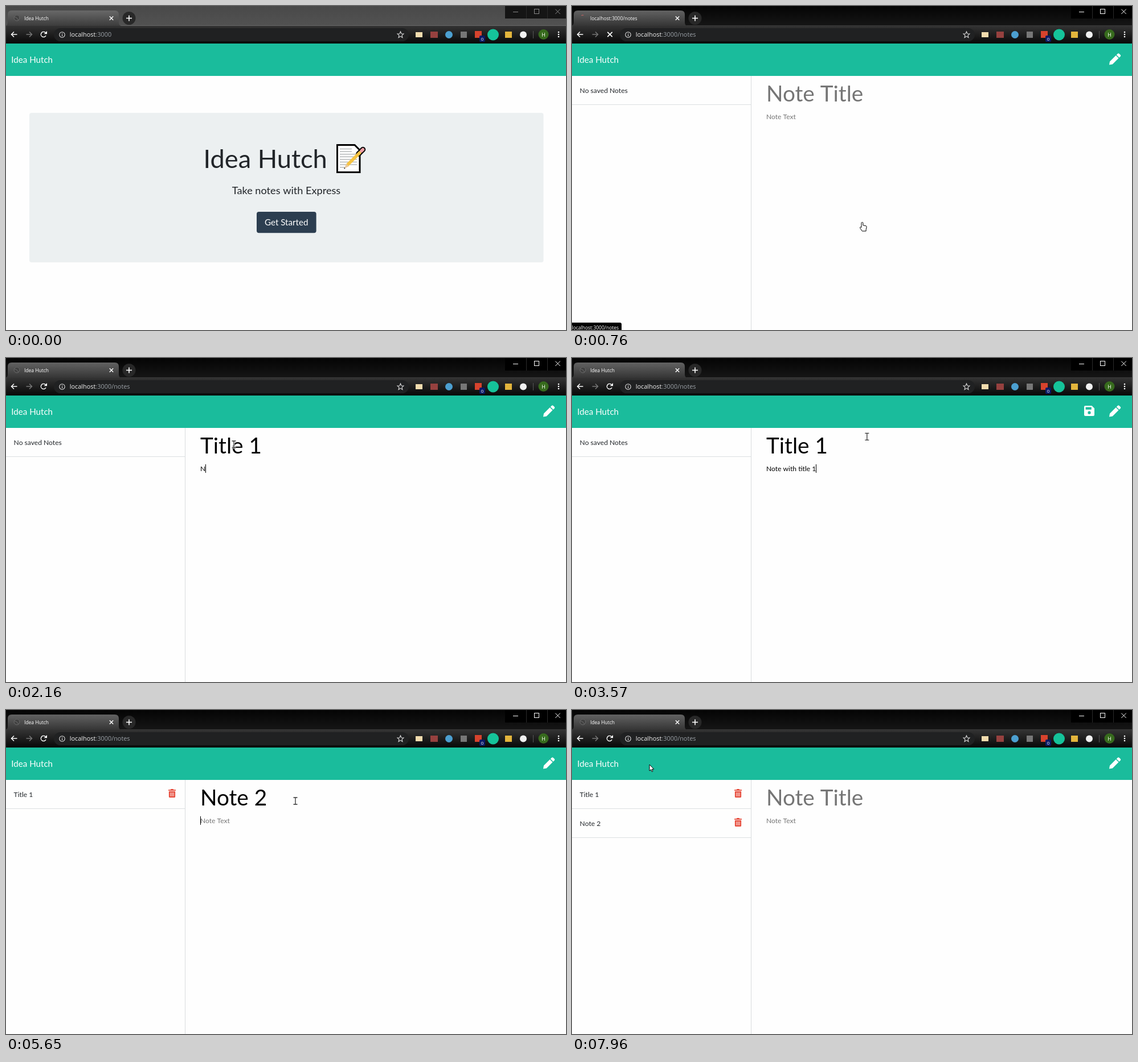
An HTML page with a canvas for the animation above (8000 ms loop, 983 by 570 pixels).

```html
<!DOCTYPE html>
<html lang="en">
<head>
<meta charset="utf-8">
<title>Idea Hutch</title>
<style>
  html, body { margin: 0; width: 100%; height: 100%; overflow: hidden; background: #fefefe; }
  canvas { display: block; }
</style>
</head>
<body>
<canvas id="stage" width="983" height="570"></canvas>
<script>
const ctx = document.getElementById('stage').getContext('2d');
const LOOP = 8000;
const APP = 'Idea Hutch';
const LATO = 'Lato, sans-serif';
const UI = '"Open Sans", sans-serif';
const INK = '#212529';
const ZOOM = 0.807; // page zoom: CSS font sizes to stage pixels
const SIZE = { body: 15 * ZOOM, brand: 18.75 * ZOOM, lead: 22.5 * ZOOM, title: 48 * ZOOM, hero: 56 * ZOOM };
const CLICK = 620, NOTES = 760, LOADED = 840;

// Typed runs: [start ms, ms per key, text]
const drafts = [
  { from: 0, saved: 4440,
    title: [[1720, 55, 'Title 1']],
    body: [[2150, 85, 'Note'], [2560, 60, ' with title 1']] },
  { from: 4440, saved: 7310,
    title: [[5000, 90, 'Note '], [5480, 1, '2']],
    body: [[5660, 85, 'Body of n'], [6480, 75, 'ote 2']] },
];
const focus = [[1050, 2100, 'title'], [2100, 4300, 'body'], [4850, 5580, 'title'], [5580, 7290, 'body']];
const saveShown = [[2230, 4440], [5740, 7310]];

// Pointer track: [ms, x, y]
const track = [
  [150, 640, 520], [520, 509.5, 380.5], [860, 509.5, 380.5], [1060, 404, 160], [1400, 400, 152],
  [3380, 400, 152], [4210, 912, 93], [4290, 908, 86], [4440, 913, 95], [4580, 913, 95],
  [4700, 576, 140], [4900, 508, 160], [6860, 508, 160], [7120, 901, 90], [7310, 902, 93],
  [7440, 902, 94], [7600, 600, 126], [7800, 250, 118], [7950, 136, 96],
];

const shapes = {
  arrow: new Path2D('M0 0V11L2.6 8.7 4.2 12.5 5.9 11.8 4.3 8.1H7.8Z'),
  hand: new Path2D('M-1.5 9V1.3Q-1.5 0 0 0 1.4 0 1.4 1.3V5.3L6.5 6.3Q7.8 6.8 7.6 8.5L6.6 13V15.5H-.2L-3.9 10Q-4.3 8.3-3 8.3Z'),
  beam: new Path2D('M-3.5-6H3.5M0-6V6M-3.5 6H3.5'),
  pencil: new Path2D('M0 20.5 1 14.7 11.7 4 16.5 8.8 5.8 19.5ZM12.8 2.9 14.8.9Q16.2-.3 17.6.9L19.7 3Q20.9 4.3 19.7 5.7L17.6 7.7Z'),
  save: new Path2D('M2 0H13.5L18 4.5V16Q18 18 16 18H2Q0 18 0 16V2Q0 0 2 0ZM2.6 2.6V6.8H12.8V2.6ZM11.6 12.2A2.6 2.6 0 1 0 6.4 12.2 2.6 2.6 0 1 0 11.6 12.2Z'),
  trash: new Path2D('M0 1.2H3.8L4.6 0H8.4L9.2 1.2H13V3H0ZM.9 4H12.1V13.5Q12.1 15 10.6 15H2.4Q.9 15 .9 13.5ZM3.4 6V13H4.4V6ZM6 6V13H7V6ZM8.6 6V13H9.6V6Z'),
  star: new Path2D('M0-5.5 1.6-1.8 5.5-1.5 2.5 1.1 3.4 5 0 2.9-3.4 5-2.5 1.1-5.5-1.5-1.6-1.8Z'),
  tab: new Path2D('M-3 35Q3 35 3 29V15Q3 8 10 8H191Q198 8 198 15V29Q198 35 204 35Z'),
  paper: new Path2D('M581.5 244.5H612L621 253.5V292.5H581.5Z'),
};

function rect(x, y, w, h, color, radius = 0) {
  ctx.fillStyle = color;
  ctx.beginPath();
  ctx.roundRect(x, y, w, h, radius);
  ctx.fill();
}
function circle(x, y, r, color) {
  ctx.fillStyle = color;
  ctx.beginPath();
  ctx.arc(x, y, r, 0, 7);
  ctx.fill();
}
function line(color, width, ...points) {
  ctx.strokeStyle = color;
  ctx.lineWidth = width;
  ctx.beginPath();
  for (let i = 0; i < points.length; i += 2) ctx.lineTo(points[i], points[i + 1]);
  ctx.stroke();
}
function arc(x, y, r, from, to, color, width) {
  ctx.strokeStyle = color;
  ctx.lineWidth = width;
  ctx.beginPath();
  ctx.arc(x, y, r, from, to);
  ctx.stroke();
}
function cross(x, y, r, color, width) {
  line(color, width, x - r, y - r, x + r, y + r);
  line(color, width, x - r, y + r, x + r, y - r);
}
function text(str, x, y, size, color, family = LATO, align = 'left') {
  ctx.font = `${size}px ${family}`;
  ctx.fillStyle = color;
  ctx.textAlign = align;
  ctx.fillText(str, x, y);
  return ctx.measureText(str).width;
}
function at(x, y, paint) {
  ctx.save();
  ctx.translate(x, y);
  paint();
  ctx.restore();
}
function icon(shape, x, y, color) {
  at(x, y, () => { ctx.fillStyle = color; ctx.fill(shapes[shape], 'evenodd'); });
}
function fade(y0, y1, top, bottom) {
  const g = ctx.createLinearGradient(0, y0, 0, y1);
  g.addColorStop(0, top);
  g.addColorStop(1, bottom);
  return g;
}
const within = (t, [from, to]) => t >= from && t < to;

function keysDown([start, step, str], t) {
  return Math.max(0, Math.min(str.length, Math.floor((t - start) / step) + 1));
}
const typed = (runs, t) => runs.map(run => run[2].slice(0, keysDown(run, t))).join('');

function titleBar(t) {
  const active = t >= 70, loading = t >= CLICK && t < LOADED;
  rect(0, 0, 983, 35, active ? fade(0, 35, '#040404', '#161616') : fade(0, 35, '#494949', '#525252'));
  rect(0, 34, 983, 1, active ? '#3a3a3a' : '#666');
  ctx.fillStyle = active ? fade(8, 35, '#626262', '#353535') : fade(8, 35, '#686868', '#3c3c3c');
  ctx.fill(shapes.tab);

  if (!loading) {
    circle(19, 21, 5.5, '#424242');
    arc(19, 21, 5, 0, 7, '#6c6c6c', 1);
    line('#6c6c6c', 1, 15, 19, 19, 21, 22, 25);
  } else if (t >= NOTES) {
    arc(19, 21, 5, 4.2, 5, '#c66', 1.2);
  }
  text(loading && t >= NOTES ? 'localhost:3000/notes' : APP, 32, 24.5, 8.5, '#fff', UI);
  cross(185, 21.5, 3.2, '#fff', 1.4);
  circle(216, 21.5, 11.5, '#282828');
  line('#fff', 1.6, 211, 21.5, 221, 21.5);
  line('#fff', 1.6, 216, 16.5, 216, 26.5);

  const glyph = active ? '#fff' : '#888';
  rect(876, 0, 107, 22, active ? '#000' : '#151515');
  rect(913, 0, 1, 22, '#2a2a2a');
  rect(950, 0, 1, 22, '#2a2a2a');
  line(glyph, 1, 890, 10.5, 899, 10.5);
  ctx.strokeRect(927.5, 5.5, 8, 8);
  cross(968.5, 9.8, 4.2, glyph, 1);
}

function toolbar(t) {
  rect(0, 35, 983, 31, fade(35, 66, '#333', '#080808'));
  rect(84, 39, 623, 23, '#202122', 11.5);
  line('#fff', 1.5, 14, 45.5, 9.5, 50, 14, 54.5);
  line('#fff', 1.5, 9.5, 50, 19.5, 50);
  line('#777', 1.5, 41, 45.5, 45.5, 50, 41, 54.5);
  line('#777', 1.5, 35.5, 50, 45.5, 50);
  if (t >= CLICK && t < LOADED) {
    cross(66.5, 50, 4.2, '#fff', 1.7);
  } else {
    arc(66, 50, 4.6, .5, 5.5, '#fff', 1.5);
    ctx.fillStyle = '#fff';
    ctx.fill(new Path2D('M72 44V49.3H66.7Z'));
  }
  arc(98.5, 50.5, 4.7, 0, 7, '#ddd', 1.1);
  rect(98, 49.8, 1.2, 3.4, '#ddd');
  rect(98, 47.5, 1.2, 1.3, '#ddd');
  const host = text('localhost', 111.7, 54, 10.9, '#f1f1f1', UI);
  text(t >= NOTES ? ':3000/notes' : ':3000', 111.7 + host, 54, 10.9, '#9aa0a6', UI);
  at(692.5, 50.5, () => {
    ctx.strokeStyle = '#ddd';
    ctx.lineWidth = 1.1;
    ctx.stroke(shapes.star);
  });

  rect(719, 46, 12, 9, '#f2dcae');
  rect(745, 45, 13, 11, '#96413f');
  circle(777.5, 50.5, 6.5, '#4c9fd0');
  rect(798, 45, 11, 11, '#777');
  rect(823, 44, 12, 12, '#d7432d');
  rect(831, 52, 10, 11, '#0a1a66', 2);
  text('0', 836, 60.5, 8, '#fff', UI, 'center');
  circle(855, 50.5, 10, '#15c39a');
  rect(876, 45, 12, 11, '#e3b53c');
  circle(908, 50.5, 6, '#f1f1f1');
  rect(925, 44, 1, 13, '#555');
  circle(943.5, 50, 9, '#376b1d');
  text('H', 943.5, 53.5, 9, '#fff', UI, 'center');
  for (const y of [46, 50, 54]) circle(970, y, 1.3, '#fff');
}

function memoPicture() {
  ctx.fillStyle = '#fff';
  ctx.fill(shapes.paper);
  ctx.strokeStyle = '#000';
  ctx.lineWidth = 3;
  ctx.stroke(shapes.paper);
  for (let i = 0; i < 8; i++) {
    line('#a9adae', 1.3, 586, 251.5 + i * 4.6, i < 2 ? 607 : i > 6 ? 596 : 616, 251.5 + i * 4.6);
  }
  ctx.lineCap = 'round';
  line('#000', 9.5, 619, 260, 626.5, 252.5);
  line('#f5c343', 5.5, 600, 279, 621, 258);
  line('#ee9fa5', 5.5, 624, 255, 626.5, 252.5);
  ctx.lineCap = 'butt';
  ctx.fillStyle = '#e9c99c';
  ctx.fill(new Path2D('M597.5 277.5 602 282 593.5 286Z'));
  circle(594.3, 285.4, 1, '#222');
}

function homePage(t) {
  rect(41, 188, 902.5, 263, '#ecf0f1', 4);
  text(APP, 346.5, 285, SIZE.hero, INK);
  memoPicture();
  text('Take notes with Express', 492, 331, SIZE.lead, INK, LATO, 'center');
  if (t >= CLICK) rect(437.4, 359.4, 109.8, 42.4, '#959fa8', 5);
  rect(440, 362, 104.6, 37.2, t >= CLICK ? '#1e2b37' : t >= 500 ? '#233240' : '#2c3e50', 4);
  text('Get Started', 492.2, 386, SIZE.brand, '#fff', LATO, 'center');
}

function caret(t, field, x, y, height) {
  const span = focus.find(f => within(t, f));
  if (!span || span[2] !== field) return;
  let last = span[0];
  for (const draft of drafts) {
    for (const run of [...draft.title, ...draft.body]) {
      const n = keysDown(run, t);
      if (n) last = Math.max(last, run[0] + run[1] * (n - 1));
    }
  }
  if ((t - last) % 1060 < 530) rect(Math.round(x), y, 1, height, '#000');
}

function field(t, name, value, hint, baseline, size, caretY, caretHeight) {
  const width = text(value || hint, 341, baseline, size, value ? '#000' : '#757575');
  caret(t, name, 341 + (value ? width : 0), caretY, caretHeight);
}

function notesPage(t) {
  rect(314, 123, 1, 447, '#d9dcde');
  const saved = drafts.filter(d => t >= d.saved);
  const rows = saved.length ? saved.map(d => typed(d.title, t)) : ['No saved Notes'];
  rows.forEach((row, i) => {
    const y = 123 + i * 51;
    text(row, 13.6, y + 29.5, SIZE.body, INK);
    rect(0, y + 50, 314, 1, '#dcdfe1');
    if (saved.length) icon('trash', 285, y + 16, '#e74c3c');
  });

  const draft = drafts.find(d => within(t, [d.from, d.saved])) || { title: [], body: [] };
  field(t, 'title', typed(draft.title, t), 'Note Title', 168, SIZE.title, 134, 40);
  field(t, 'body', typed(draft.body, t), 'Note Text', 199, SIZE.body, 187, 15);

  icon('pencil', 943, 83, '#fff');
  if (saveShown.some(s => within(t, s))) icon('save', 899, 84, '#fff');
}

function pointer(t) {
  if (t < track[0][0]) return;
  const next = track.findIndex(p => p[0] > t);
  const b = track.at(next), a = next > 0 ? track[next - 1] : b;
  const k = a === b ? 0 : (t - a[0]) / (b[0] - a[0]);
  const x = a[1] + (b[1] - a[1]) * k, y = a[2] + (b[2] - a[2]) * k;

  let kind = 'arrow';
  if (t < 870) kind = x < 545 && y < 399 ? 'hand' : 'arrow';
  else if (y > 123 && x > 330) kind = 'beam';
  else if (y < 106 && x > 895) kind = 'hand';

  at(x, y, () => {
    if (kind === 'beam') {
      ctx.strokeStyle = '#fff';
      ctx.lineWidth = 3;
      ctx.stroke(shapes.beam);
      ctx.strokeStyle = '#333';
      ctx.lineWidth = 1.3;
      ctx.stroke(shapes.beam);
    } else {
      ctx.fillStyle = '#fff';
      ctx.fill(shapes[kind]);
      ctx.strokeStyle = '#000';
      ctx.lineWidth = 1;
      ctx.stroke(shapes[kind]);
    }
  });
}

function draw(now) {
  const t = now % LOOP;
  rect(0, 0, 983, 570, '#fefefe');
  titleBar(t);
  toolbar(t);
  rect(0, 66, 983, 57, '#1abc9c');
  text(APP, 9.3, 100, SIZE.brand, '#fff');
  (t < NOTES ? homePage : notesPage)(t);
  if (t >= 500 && t < 1050) {
    rect(0, 557, 87, 13, '#000', [0, 3, 0, 0]);
    text('localhost:3000/notes', -.5, 568.5, 8.5, '#fff', UI);
  }
  pointer(t);
  requestAnimationFrame(draw);
}
requestAnimationFrame(draw);
</script>
</body>
</html>
```
